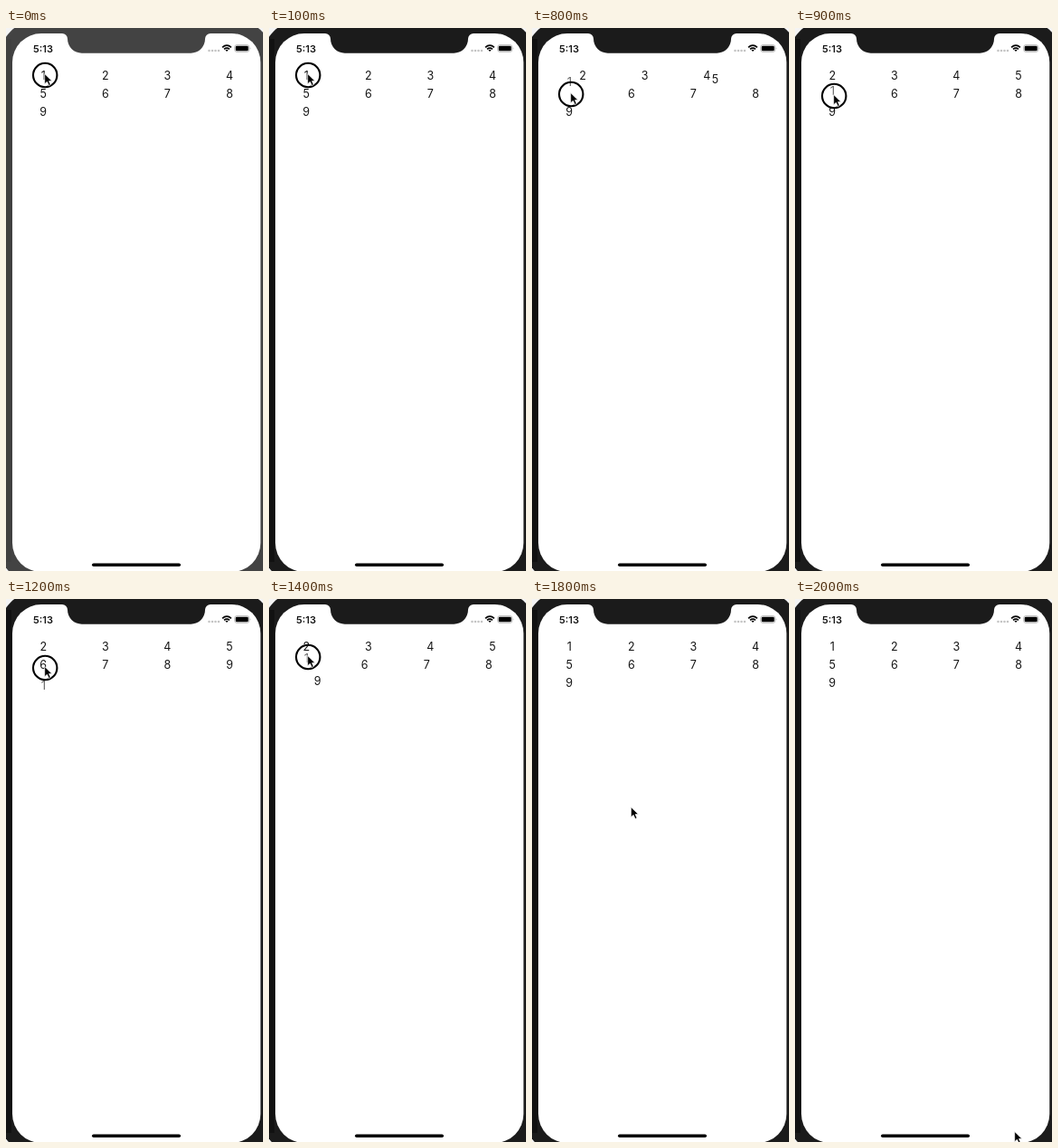
These frames come from a looping animation (284 by 599 pixels, 2100 ms). An HTML page:

```html
<!DOCTYPE html>
<html lang="en">
<head>
<meta charset="utf-8">
<title>Reorderable grid</title>
<style>
  html, body { margin: 0; width: 100%; height: 100%; overflow: hidden; background: #f4f4f4; }
  svg { display: block; width: 284px; height: 599px; }
  text { font-family: Inter, Roboto, sans-serif; text-anchor: middle; fill: #161616; }
  #cells text { font-size: 12.5px; }
  .time { font-size: 11px; font-weight: 600; }
</style>
</head>
<body>
<svg viewBox="0 0 284 599">
  <rect id="bezel" x="-8" y="-9" width="304" height="623" rx="44"/>
  <rect id="edge" y="12" width="6" height="577"/>
  <rect x="7" y="6" width="274.3" height="594" rx="32" fill="#fff"/>
  <path id="notch" d="M62 5V6A6 6 0 0 1 68 12A15.700 15.700 0 0 0 84 27.700H204A15.700 15.700 0 0 0 220 12A6 6 0 0 1 226 6V5Z"/>

  <text class="time" x="41" y="26.5">5:13</text>
  <path d="M224.5 25H235.1" stroke="#c4c4c4" stroke-width="2.6" stroke-linecap="round" stroke-dasharray="0 3.5"/>
  <path d="M239.1 21.3Q244 17 248.9 21.3M241 23.4Q244 20.9 247 23.4" fill="none" stroke="#000" stroke-width="1.7"/>
  <path d="M242.4 24.2Q244 23.2 245.6 24.2L244 26Z"/>
  <rect x="252.7" y="18.7" width="16" height="7.6" rx="2.2" fill="none" stroke="#aaa" stroke-width=".8"/>
  <rect x="253.7" y="19.7" width="14" height="5.6" rx="1.3"/>
  <path d="M269.7 21.2Q271 22.5 269.7 23.8Z" fill="#999"/>

  <g id="cells"></g>
  <rect x="95" y="590.6" width="98" height="3.5" rx="1.75"/>
  <g id="pointer">
    <circle id="ring" r="13.2" fill="none" stroke="#000" stroke-width="2.1"/>
    <path d="M-.5 -1.5V9.700L2.200 7.300L4.200 11.500L6.100 10.600L4.300 6.600H7.700Z" stroke="#fff" stroke-width=".7"/>
  </g>
</svg>
<script>
const LOOP = 2100, STEP = 100, LAG = 90;
const $ = id => document.getElementById(id);
const ramp = (t, from, to) => Math.min(1, Math.max(0, (t - from) / (to - from)));
const ease = p => p * p * (3 - 2 * p);
const shift = (t, from) => ease(ramp(t, from, from + 200));

// Pointer height: sum of straight strokes [from, to, distance]
const strokes = [
  [600, 800, 21], [800, 900, 2], [900, 1100, 27],   // drag down
  [1100, 1200, -26], [1200, 1500, -18], [1600, 1700, -6],   // drag back
  [1700, 2000, 537],   // leave
];
const pointerY = t => strokes.reduce((y, [from, to, d]) => y + d * ramp(t, from, to), 52);

const slot = i => [41.2 + 68.6 * (i % 4), 52 + 20 * Math.floor(i / 4)];

const cells = Array.from({ length: 9 }, (_, i) => {
  const el = document.createElementNS("http://www.w3.org/2000/svg", "text");
  el.textContent = i + 1;
  el.setAttribute("y", 4.5);
  return el;
});
$("cells").append(...cells.slice(1), cells[0]);

function place(el, x, y, scale = 1) {
  el.setAttribute("transform", `translate(${x} ${y}) scale(${scale})`);
}

function draw(t) {
  const bright = t < STEP;
  $("bezel").style.fill = $("notch").style.fill = bright ? "#434343" : "#1b1b1b";
  $("edge").style.fill = bright ? "#404040" : "#111";

  // Cells 2-5 and 6-9 each step back one slot while the dragged cell is past them
  const first = shift(t, 660) - shift(t, 1460);
  const second = shift(t, 980) - shift(t, 1230);
  for (let i = 1; i < 9; i++) {
    const [x0, y0] = slot(i), [x1, y1] = slot(i - 1);
    const p = i < 5 ? first : second;
    place(cells[i], x0 + (x1 - x0) * p, y0 + (y1 - y0) * p);
  }

  // The dragged cell trails the pointer and floats slightly above it
  const lift = ramp(t, 300, 600) - ramp(t, 1600, 1800);
  const float = shift(t, 600) - shift(t, 1600);
  place(cells[0], 41.2 + .3 * lift, pointerY(Math.min(t - LAG, 1700)) - 4 * float, 1 + .06 * lift);
  cells[0].style.opacity = 1 - .37 * lift;

  place($("pointer"), 43.2 + 200 * ramp(t, 1700, 2000), pointerY(t));
  $("ring").style.display = t < 1800 ? "" : "none";
}

const start = performance.now();
function tick() {
  const t = (performance.now() - start) % LOOP;
  draw(Math.floor(t / STEP) * STEP);
  requestAnimationFrame(tick);
}
tick();
</script>
</body>
</html>
```
